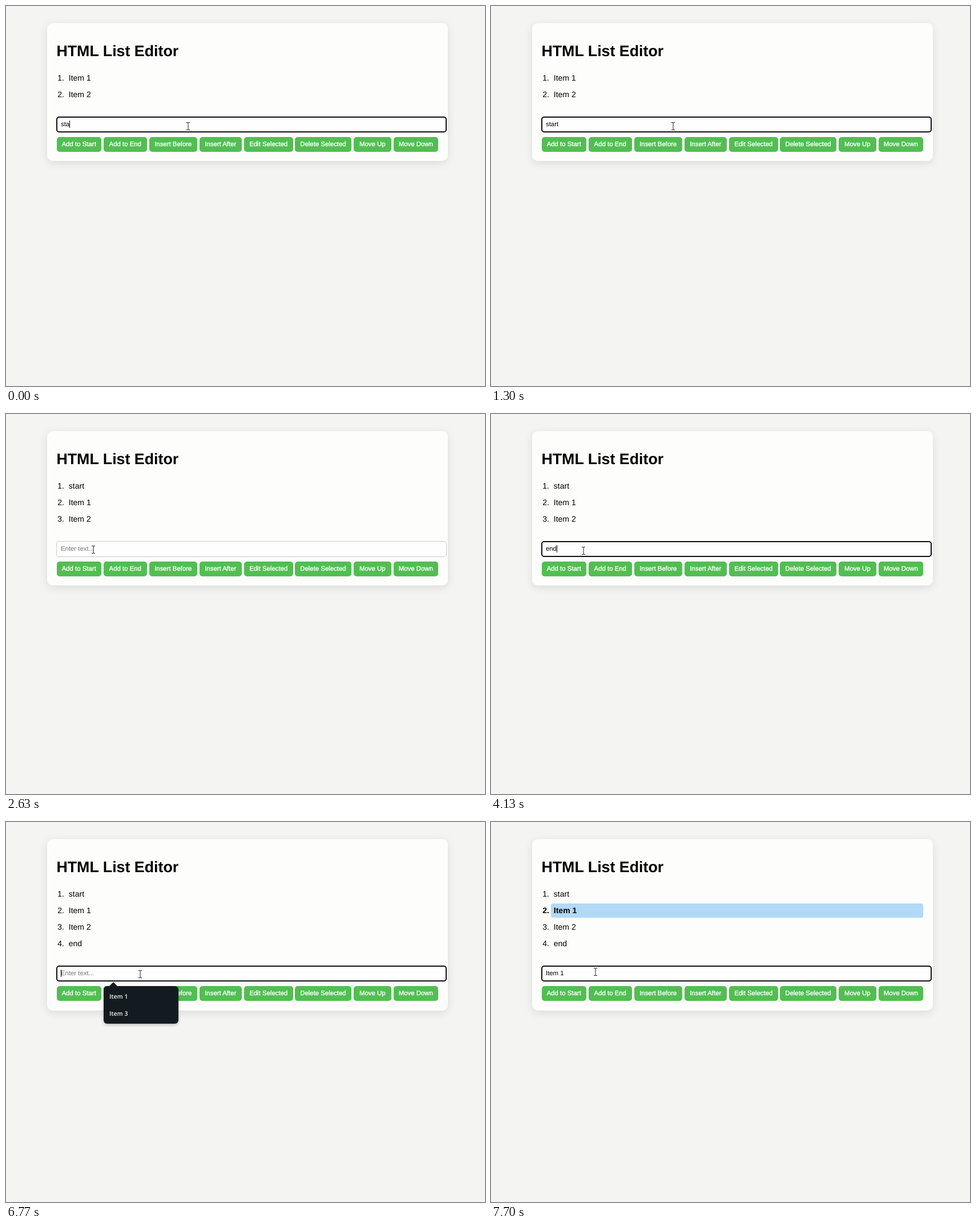
Recreate the animation shown at these times as an HTML page. Size 839 by 667 pixels, loop 8000 ms.

```html
<!DOCTYPE html>
<html lang="en">
<head>
<meta charset="utf-8">
<title>HTML List Editor</title>
<style>
  html, body { margin: 0; width: 100%; height: 100%; overflow: hidden; background: #f4f4f3; }
  #stage {
    position: relative; width: 839px; height: 667px; overflow: hidden;
    font-family: "Liberation Sans", Arial, sans-serif; color: #000;
    text-rendering: geometricPrecision; cursor: default;
  }
  #stage * { box-sizing: border-box; }
  #stage div, #cursor { position: absolute; white-space: pre; }
  #card {
    left: 72px; top: 30px; width: 702px; background: #fdfdfc;
    border-radius: 10px; box-shadow: 0 4px 15px rgba(0, 0, 20, .1);
  }
  #title { left: 88.4px; top: 60px; line-height: 38px; font-size: 26.8px; font-weight: bold; }
  .item { left: 105px; width: 652px; height: 25px; padding-left: 4.8px; border-radius: 4px; font-size: 14px; line-height: 25px; }
  .item span { position: absolute; left: -14.7px; }
  .item.selected { background: #b2d9f7; font-weight: bold; }
  #controls { left: 0; top: 0; }
  #field {
    left: 88px; top: 194px; width: 684px; height: 28px; border-radius: 5px;
    border: 1px solid #c8c8c8; background: #fefefe;
  }
  #field.focused { border: 2px solid #101014; }
  .line { left: 96px; top: 194px; font-size: 11.35px; line-height: 28px; }
  #hint { color: #757575; }
  #caret { display: inline-block; width: 1px; height: 13px; margin-right: -1px; background: #000; vertical-align: -2.5px; }
  .button {
    top: 230px; height: 26px; border-radius: 5px; background: #52be52; color: #fff;
    font-size: 11.4px; line-height: 26px; text-align: center; -webkit-text-stroke: .35px #fff;
  }
  .button.hover { background: #47a64b; }
  #popup {
    left: 171px; top: 230px; width: 131px; height: 66px; border-radius: 6px; background: #141b20;
    box-shadow: 0 2px 5px rgba(0, 0, 0, .25); color: #f2f4f4;
    font: 600 10.6px/30px "Open Sans", sans-serif;
  }
  #popup::before {
    content: ""; position: absolute; left: 10px; top: -7px;
    border: 7px solid transparent; border-top: 0; border-bottom-color: #141b20;
  }
  #popup div { left: 10px; }
  #cursor { left: 0; top: 0; width: 24px; height: 24px; overflow: visible; }
</style>
</head>
<body>
<div id="stage">
  <div id="card"></div>
  <div id="title">HTML List Editor</div>
  <div id="list"></div>
  <div id="controls">
    <div id="field"></div>
    <div id="hint" class="line">Enter text...</div>
    <div class="line"><span id="text"></span><span id="caret"></span></div>
    <div id="popup"><div style="top:4px">Item 1</div><div style="top:34px">Item 3</div></div>
  </div>
  <svg id="cursor">
    <path id="beam" d="M-3-6.5h2.5l.5.7.5-.7H3M0-6V6M-3 6.5h2.5l.5-.7.5.7H3" fill="none" stroke="#222"/>
    <path id="arrow" d="M0 0v13l3-3 2 5 2-1-2-4.500h4z" fill="#fff" stroke="#111" stroke-width=".9"/>
    <path id="hand" d="M-1 0Q0-1 1 0V5L6 6Q8 6.500 8 9L7 15H0L-4 10Q-4 8-1 9.500Z" fill="#fff" stroke="#111" stroke-width=".9"/>
  </svg>
</div>
<script>
const DURATION = 8000, ROW = 29.25, FIRST_ROW = 113.5;
const $ = id => document.getElementById(id);

const BUTTONS = [
  ["Add to Start", 88.5, 78.5], ["Add to End", 171, 75.5], ["Insert Before", 250.5, 84.5],
  ["Insert After", 338.5, 74.5], ["Edit Selected", 417, 85.5], ["Delete Selected", 506, 99],
  ["Move Up", 609, 65.5], ["Move Down", 678.5, 78.5]
];

const TWO = ["Item 1", "Item 2"], THREE = ["start", ...TWO], FOUR = [...THREE, "end"];

// Each step changes only the listed properties from its time on.
const STEPS = [
  [0, { items: TWO, text: "sta", focus: true, caret: true, popup: false, selected: -1 }],
  [130, { text: "star" }],
  [330, { text: "start" }],
  [870, { caret: false }],
  [1970, { items: THREE, text: "", focus: false }],
  [2900, { focus: true, caret: true }],
  [2970, { popup: true }],
  [3220, { text: "e", popup: false }],
  [3900, { text: "en" }],
  [4070, { text: "end" }],
  [4970, { items: FOUR, text: "", focus: false, caret: false }],
  [6430, { focus: true, caret: true }],
  [6530, { popup: true }],
  [7100, { focus: false, caret: false, popup: false }],
  [7130, { text: "Item 1", selected: 1 }],
  [7370, { focus: true, caret: true }],
  [7700, { caret: false }]
];

const PATH = [
  [0, 319, 211], [1700, 319, 211], [1920, 131, 240], [2629, 131, 240],
  [2630, 153, 238], [2669, 153, 238], [2670, 154, 241], [2870, 154, 241],
  [2960, 162, 240], [4770, 162, 240], [4920, 233, 269], [5999, 233, 269],
  [6030, 235, 267], [6800, 235, 267], [7070, 190, 158], [7200, 190, 158],
  [7360, 183, 263], [DURATION, 183, 263]
];

function make(className, parent) {
  const el = document.createElement("div");
  el.className = className;
  parent.appendChild(el);
  return el;
}

const buttons = BUTTONS.map(([label, left, width]) => {
  const el = make("button", $("controls"));
  el.textContent = label;
  el.style.left = left + "px";
  el.style.width = width + "px";
  return el;
});
$("controls").appendChild($("popup"));

const rows = FOUR.map((_, i) => {
  const el = make("item", $("list"));
  el.style.top = FIRST_ROW + i * ROW + "px";
  el.innerHTML = `<span>${i + 1}.</span><b style="font-weight:inherit"></b>`;
  return el;
});

function stateAt(t) {
  return Object.assign({}, ...STEPS.filter(([start]) => start <= t).map(step => step[1]));
}

function cursorAt(t) {
  const i = PATH.findIndex(([time]) => time > t);
  const [t0, x0, y0] = PATH[i - 1], [t1, x1, y1] = PATH[i];
  const p = (t - t0) / (t1 - t0), eased = p * p * (3 - 2 * p);
  return [x0 + (x1 - x0) * eased, y0 + (y1 - y0) * eased];
}

const show = (id, on) => { $(id).style.display = on ? "" : "none"; };

function render(t) {
  const state = stateAt(t), count = state.items.length;
  const growth = (count - 2) * ROW, shift = Math.floor(growth);
  const [x, y] = cursorAt(t);

  $("card").style.height = 242 + growth + "px";
  $("controls").style.transform = `translateY(${shift}px)`;
  rows.forEach((row, i) => {
    row.style.display = i < count ? "" : "none";
    row.lastChild.textContent = state.items[i] || "";
    row.classList.toggle("selected", i === state.selected);
  });

  $("field").classList.toggle("focused", state.focus);
  $("text").textContent = state.text;
  show("hint", !state.text);
  show("caret", state.caret);
  show("popup", state.popup);

  const localY = y - shift;
  const onField = localY >= 194 && localY < 222;
  let onButton = false;
  buttons.forEach((button, i) => {
    const [, left, width] = BUTTONS[i];
    const hit = localY >= 230 && localY < 256 && x >= left && x < left + width;
    button.classList.toggle("hover", hit);
    onButton = onButton || hit;
  });
  const onItem = y >= FIRST_ROW && y < FIRST_ROW + count * ROW - 4;
  show("beam", onField);
  show("hand", onButton || onItem);
  show("arrow", !onField && !onButton && !onItem);
  $("cursor").style.transform = `translate(${Math.round(x)}px, ${Math.round(y)}px)`;
}

const start = performance.now();
function tick() {
  render((performance.now() - start) % DURATION);
  requestAnimationFrame(tick);
}
tick();
</script>
</body>
</html>
```
